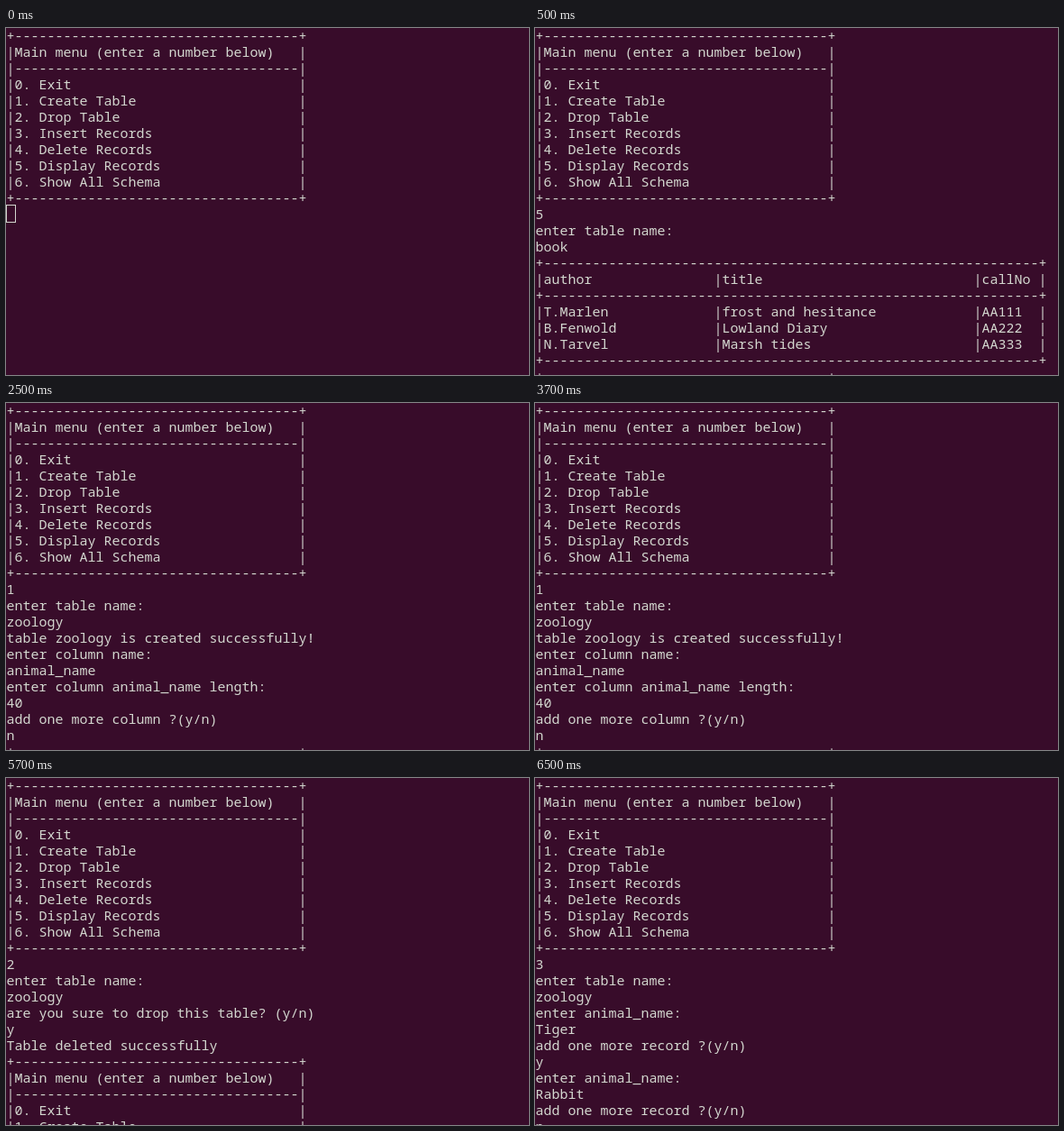
Recreate the animation shown at these times as an HTML page. Size 580x385 px, loop 8 s.

```html
<!DOCTYPE html>
<html lang="en">
<head>
<meta charset="utf-8">
<title>Table manager in a terminal</title>
<style>
  html, body { margin: 0; width: 100%; height: 100%; overflow: hidden; background: #380c2a; }
  svg { display: block; width: 580px; height: 385px; }
  text { font: 15px "Noto Sans Mono", "DejaVu Sans Mono", monospace; fill: #d3d7cf; white-space: pre; }
  #cursor { fill: none; stroke: #d3d7cf; }
</style>
</head>
<body>
<svg viewBox="0 0 580 385">
  <g id="screen"></g>
  <rect id="cursor" x="0.5" y="196.5" width="10" height="19"/>
</svg>
<script>
const LOOP = 8000, ROW = 18, ROWS = 22;
const screen = document.getElementById("screen");
const cursor = document.getElementById("cursor");

const rule = (width, end = "+") => end + "-".repeat(width) + end;
const cells = (widths, values) =>
  "|" + values.map((v, i) => v.padEnd(widths[i])).join("|") + "|";

const item = text => cells([35], [text]);
const menu = [
  rule(35),
  item("Main menu (enter a number below)"),
  rule(35, "|"),
  ...["Exit", "Create Table", "Drop Table", "Insert Records",
      "Delete Records", "Display Records", "Show All Schema"]
    .map((name, i) => item(`${i}. ${name}`)),
  rule(35)
];

const book = (...values) => cells([21, 31, 7], values);

// Each scene is the output printed under the menu from its start time.
const scenes = [
  { start: 0, lines: [] },
  { start: 500, lines: [
    "5", "enter table name:", "book",
    rule(61),
    book("author", "title", "callNo"),
    rule(61),
    book("T.Marlen", "frost and hesitance", "AA111"),
    book("B.Fenwold", "Lowland Diary", "AA222"),
    book("N.Tarvel", "Marsh tides", "AA333"),
    rule(61),
    ...menu
  ] },
  { start: 2500, lines: [
    "1", "enter table name:", "zoology",
    "table zoology is created successfully!",
    "enter column name:", "animal_name",
    "enter column animal_name length:", "40",
    "add one more column ?(y/n)", "n",
    ...menu
  ] },
  { start: 4500, lines: [
    "2", "enter table name:", "zoology",
    "are you sure to drop this table? (y/n)", "y",
    "Table deleted successfully",
    ...menu
  ] },
  { start: 6500, lines: [
    "3", "enter table name:", "zoology",
    "enter animal_name:", "Tiger", "add one more record ?(y/n)", "y",
    "enter animal_name:", "Rabbit", "add one more record ?(y/n)", "n"
  ] }
];

const rows = Array.from({ length: ROWS }, (_, i) => {
  const row = document.createElementNS("http://www.w3.org/2000/svg", "text");
  row.setAttribute("x", 0.5);
  row.setAttribute("y", 14 + i * ROW);
  return screen.appendChild(row);
});

let shown = null;
function render(time) {
  const scene = scenes.findLast(s => s.start <= time);
  if (scene === shown) return;
  shown = scene;
  const lines = [...menu, ...scene.lines];
  rows.forEach((row, i) => { row.textContent = lines[i] || ""; });
  cursor.style.display = scene.lines.length ? "none" : "";
}

const origin = performance.now();
function tick() {
  render((performance.now() - origin) % LOOP);
  requestAnimationFrame(tick);
}
tick();
</script>
</body>
</html>
```
